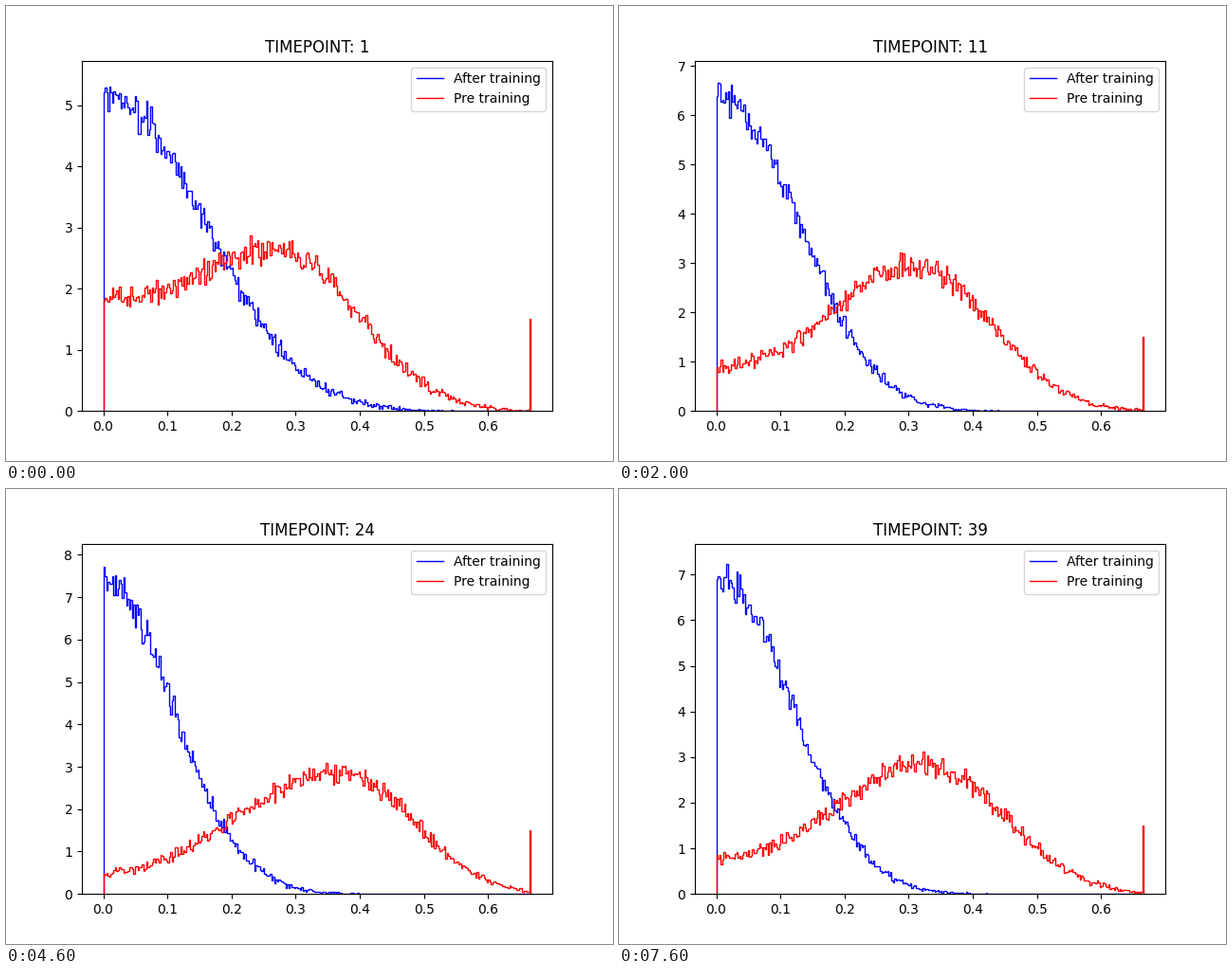
Recreate the animation shown at these times as a matplotlib script. Size 640 px wide and 480 px high, loop 7800 ms.

```python
from math import gamma

import numpy as np
import matplotlib.pyplot as plt
from matplotlib.animation import FuncAnimation

POINTS = 39
BINS = 300
RIGHT = 0.6666
EDGES = np.linspace(0, RIGHT, BINS + 1)
MID = (EDGES[:-1] + EDGES[1:]) / 2

# Key time points and the shape of both curves there
KEYS = [1, 7, 16, 20, 28, 34, 39]
PEAK = [5.15, 6.11, 6.73, 7.68, 7.17, 5.88, 6.90]   # height of "after"
POWER = [2.1, 2.2, 2.05, 1.95, 2.03, 1.65, 2.07]    # fall-off of "after"
MODE = [.255, .295, .305, .365, .36, .285, .315]    # top of "pre"
FLOOR = [.70, .25, .31, .07, .16, .46, .24]         # left level of "pre"
SPREAD = [.189, .189, .16, .154, .178, .212, .182]  # right width of "pre"


def after_curve(peak, power):
    width = 1 / (peak * gamma(1 + 1 / power))
    return peak * np.exp(-(MID / width) ** power)


def pre_curve(mode, floor, spread):
    d = MID - mode
    rise = 0.12 + 0.85 * (mode - 0.255)
    left = floor + (1 - floor) * np.exp(-(d / rise) ** 2)
    right = np.exp(-(np.abs(d) / spread) ** 2.2)
    curve = np.where(d < 0, left, right)
    return curve / (curve.sum() * RIGHT / BINS)


def jitter(curve, rng):
    """Counting noise: spread grows with the square root of the height."""
    noise = np.clip(rng.normal(size=BINS), -2, 2)
    return np.maximum(curve + 0.08 * np.sqrt(curve) * noise, 0)


fig, ax = plt.subplots(figsize=(6.4, 4.8), dpi=100)


def draw(i):
    t = i + 1
    rng = np.random.default_rng(t)
    peak, power, mode, floor, spread = (
        np.interp(t, KEYS, k) for k in (PEAK, POWER, MODE, FLOOR, SPREAD))
    after = jitter(after_curve(peak, power), rng)
    pre = jitter(pre_curve(mode, floor, spread), rng)
    pre[-1] = 1.5

    ax.clear()
    ax.stairs(after, EDGES, color="blue", lw=1)
    ax.stairs(pre, EDGES, color="red", lw=1)
    handles = [ax.plot([], [], color=c, lw=1)[0] for c in ("blue", "red")]
    ax.legend(handles, ["After training", "Pre training"], loc="upper right")
    ax.set_xlim(-0.05 * RIGHT, 1.05 * RIGHT)
    ax.set_ylim(0, 1.05 * 1.06 * peak)
    ax.set_title(f"TIMEPOINT: {t}")
    return []


anim = FuncAnimation(fig, draw, frames=POINTS, init_func=lambda: [],
                     interval=200, repeat=True, repeat_delay=0)
plt.show()
```
